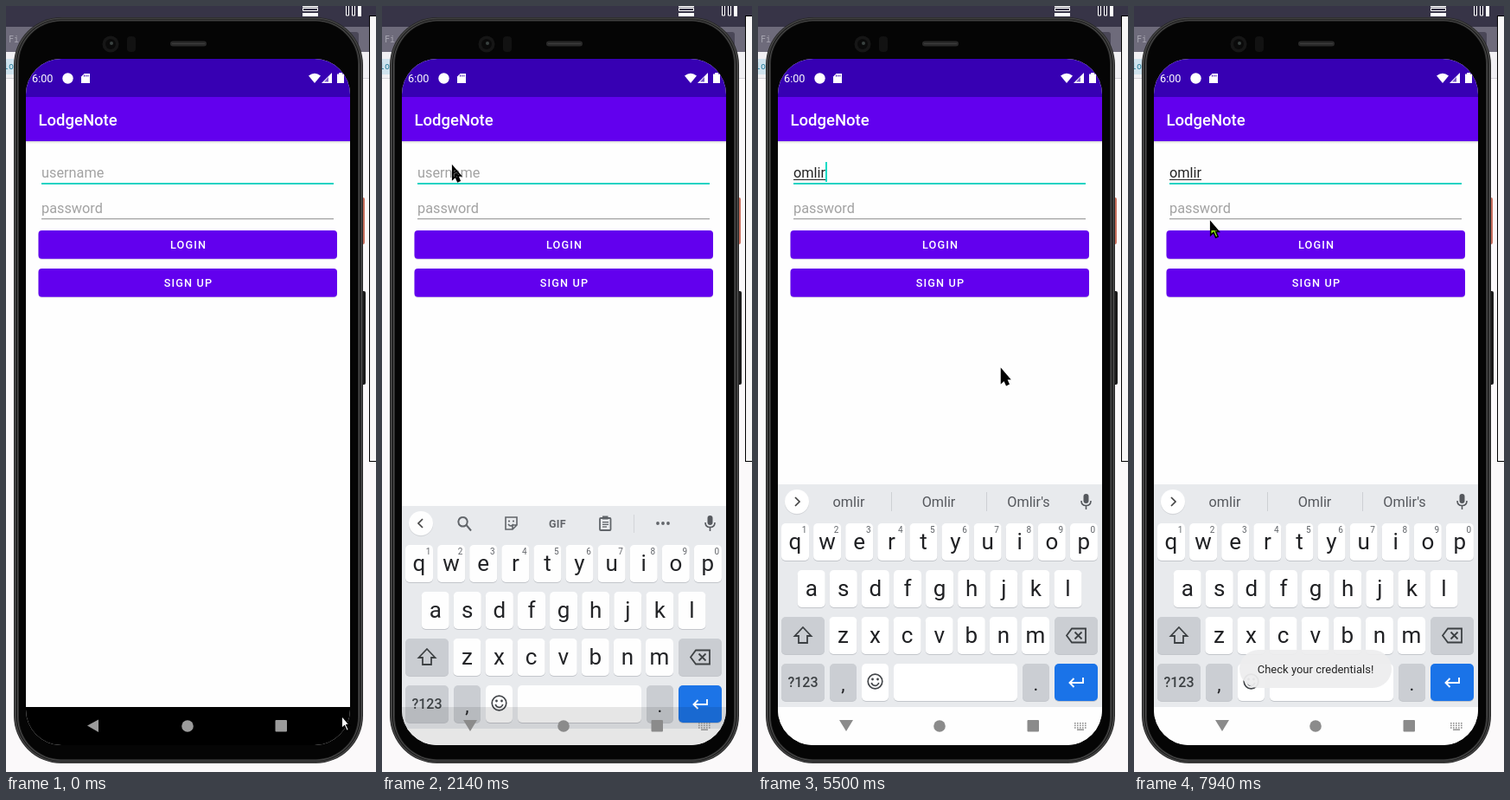
An HTML page with a canvas for the animation above (8 s loop, 428 by 884 pixels).

```html
<!DOCTYPE html>
<html lang="en">
<head>
<meta charset="utf-8">
<title>Login screen</title>
<style>
html, body { margin: 0; width: 100%; height: 100%; overflow: hidden; background: #fbf9fa; }
canvas { display: block; }
</style>
</head>
<body>
<canvas id="stage" width="428" height="884"></canvas>
<script>
const ctx = document.getElementById('stage').getContext('2d');
const LOOP = 8000, STEP = 78.6;
const NAME = 'omlir';
const TEAL = '#03dac5', PURPLE = '#6200ee', GREY = '#5f6368';

// time, x, y of the pointer
const PATH = [
  [0, 387, 817], [240, 335, 690], [560, 185, 340], [870, 107, 176], [1105, 88, 148], [1190, 88, 148],
  [1412, 86, 218], [1495, 85, 226], [1570, 83, 171], [1660, 83, 171], [1725, 80.5, 183], [4325, 80.5, 183],
  [4402, 80.5, 209], [4560, 118, 395], [4640, 155, 445], [4880, 375, 771], [4960, 374, 765],
  [5180, 368, 621], [5720, 221, 280], [7160, 221, 280], [7938, 87.5, 247.5]
];
const TYPED = [[2540, 1], [2770, 2], [2930, 3], [3080, 4], [3150, 5]];
const MARKED = [[2770, 1], [2930, 3], [3080, 4], [3400, 5]];
const HINTS = [
  [2770, ['on', 'om', 'omelet']],
  [2930, ['om', NAME, 'omelet']],
  [3080, ['oml', NAME, 'omelet']],
  [3400, [NAME, 'Omlir', "Omlir's"]]
];

const clamp = v => Math.max(0, Math.min(1, v));
const at = (list, t) => list.reduce((v, [s, x]) => t >= s ? x : v, 0);

function rect(x, y, w, h, color) {
  ctx.fillStyle = color;
  ctx.fillRect(x, y, w, h);
}
function box(x, y, w, h, r, color) {
  ctx.beginPath();
  ctx.roundRect(x, y, w, h, r);
  ctx.fillStyle = color;
  ctx.fill();
}
function frame(x, y, w, h, r, color, width = 1) {
  ctx.beginPath();
  ctx.roundRect(x, y, w, h, r);
  ctx.strokeStyle = color;
  ctx.lineWidth = width;
  ctx.stroke();
}
function disc(x, y, r, color) {
  ctx.beginPath();
  ctx.arc(x, y, r, 0, 7);
  ctx.fillStyle = color;
  ctx.fill();
}
function shape(d, color, x = 0, y = 0, width = 0) {
  ctx.save();
  ctx.translate(x, y);
  const p = new Path2D(d);
  if (width) {
    ctx.strokeStyle = color;
    ctx.lineWidth = width;
    ctx.stroke(p);
  } else {
    ctx.fillStyle = color;
    ctx.fill(p);
  }
  ctx.restore();
}
function text(s, x, y, size, color, align = 'left', weight = 400, gap = 0) {
  ctx.font = `${weight} ${size}px Roboto, Arial, sans-serif`;
  ctx.letterSpacing = gap + 'px';
  ctx.textAlign = align;
  ctx.fillStyle = color;
  ctx.fillText(s, x, y);
}

function backdrop() {
  rect(0, 0, 428, 884, '#fbf9fa');
  rect(0, 0, 428, 24, '#373447');
  rect(0, 24, 428, 29, '#6e6b7b');
  rect(0, 53, 428, 31, '#f1f0f3');
  rect(0, 61, 9, 18, '#cfe3ee');
  rect(0, 83, 428, 1, '#d4d2d8');
  ctx.font = '10px "DejaVu Sans Mono", monospace';
  ctx.letterSpacing = '0px';
  ctx.textAlign = 'left';
  ctx.fillStyle = '#a9a7b2';
  ctx.fillText('Fi', 3, 42);
  ctx.fillStyle = '#2c7f9c';
  ctx.fillText('lo', -3, 73);
  box(396, 30, 12, 17, 3, '#4a4757');
  rect(343, 0, 18, 1.5, '#fff');
  frame(343.5, 2.5, 17, 3, 0, '#fff');
  rect(343, 8, 18, 4, '#fff');
  frame(393.5, -1, 3, 12, 0, '#fff');
  frame(400.5, -1, 3, 12, 0, '#fff');
  rect(407, 0, 4, 12, '#fff');
  rect(420, 11, 8, 515, '#000');
  rect(421, 12, 8, 513, '#f8f7f7');
}

function body() {
  box(408, 221, 7, 54, 2, '#c9705e');
  box(408, 329, 8, 108, 2, '#1b1b1b');
  // rim shades from the outer edge inwards
  ['#262626', '#4b4b4b', '#343434', '#161616', '#4f4f4f', '#2a2a2a', '#050505'].forEach((c, i) =>
    box(9 + i, 13 + i * .8, 404 - 2 * i, 861 - 1.6 * i, 55 - i, c));
  disc(121, 44, 9.5, '#161616');
  disc(121, 44, 6, '#0a0a0a');
  disc(122, 43, 2, '#3a4240');
  box(140, 35, 10, 18, 4, '#121212');
  box(190, 40.5, 42, 6, 3, '#292929');
  rect(192, 43, 38, 1, '#3d3d3d');
}

function header() {
  rect(23, 61, 375, 792, '#fefefe');
  const g = ctx.createLinearGradient(0, 156, 0, 159);
  g.addColorStop(0, 'rgba(0,0,0,.16)');
  g.addColorStop(1, 'rgba(0,0,0,0)');
  rect(23, 156, 375, 3, g);
  rect(23, 61, 375, 45, '#3700b3');
  rect(23, 105, 375, 51, PURPLE);
  text('6:00', 30, 88, 12.7, '#fff');
  disc(71.5, 83.5, 6.2, '#fff');
  shape('M90.500 78H97V89H87V81.500Z', '#fff');
  for (let i = 0; i < 3; i++) rect(90 + i * 2.2, 79.5, 1, 2, '#3700b3');
  shape('M350 80.500Q357 75 364 80.500L357 89Z', '#fff');
  shape('M377 77V89H365Z', '#fff');
  shape('M373 82V87.500H368Z', '#7a58cc');
  shape('M383 78.500H385.200V77H388.800V78.500H391V89H383Z', '#fff');
  text('LodgeNote', 37.5, 138, 18.5, '#fff', 'left', 500);
}

function button(label, y, lit) {
  box(37.5, y + 1, 345.5, 32.7, 4, 'rgba(0,0,0,.1)');
  box(37.5, y, 345.5, 32.7, 4, PURPLE);
  if (lit) box(37.5, y, 345.5, 32.7, 4, `rgba(255,255,255,${lit})`);
  text(label, 211, y + 21.3, 12.7, '#fff', 'center', 500, 1.15);
}

function form(t) {
  const n = at(TYPED, t), word = NAME.slice(0, n);
  if (n) text(word, 41, 198, 16.3, '#222');
  else text('username', 41, 198, 16.3, '#a2a2a2');
  const wide = s => ctx.measureText(s).width;
  if (n) {
    const m = at(MARKED, t);
    if (m) rect(41, 200, wide(NAME.slice(0, m)), 1, '#222');
  }
  rect(41, 204, 338, 2, '#1fd3c3');
  let blink;
  if (t < 2540) blink = t >= 540 && (t - 540) % 1000 < 500;
  else blink = t < 3930 || (t - 3930) % 1000 >= 470;
  if (blink) rect(41 + (n ? wide(word) : 0), 180, 2, 23, TEAL);
  text('password', 41, 239, 16.3, '#a2a2a2');
  rect(41, 245, 338, 1.3, '#a3a3a3');
  const lit = .19 * clamp((t - 5880) / 200) * clamp((6560 - t) / 300);
  button('LOGIN', 259, lit);
  button('SIGN UP', 303, 0);
}

function key(x, y, w, color) {
  box(x, y + 1, w, 43, 5, '#c3c6cb');
  box(x, y, w, 43, 5, color);
}

function letters(row, x0, y, digits) {
  [...row].forEach((c, i) => {
    const x = x0 + i * 37.1;
    key(x - 16, y, 32, '#fff');
    text(c, x, y + 30, 26, '#202124', 'center');
    if (digits) text((i + 1) % 10, x + 10.5, y + 10.5, 10, GREY, 'center');
  });
}

function smiley(x, y, r, color) {
  ctx.beginPath();
  ctx.arc(x, y, r, 0, 7);
  ctx.strokeStyle = color;
  ctx.lineWidth = 1.7;
  ctx.stroke();
  disc(x - 3, y - 2.5, 1.4, color);
  disc(x + 3, y - 2.5, 1.4, color);
  ctx.beginPath();
  ctx.arc(x, y + .5, r * .52, .2, 2.94);
  ctx.stroke();
}

function toolbar() {
  shape('M98 574L103 580M93.500 564.500a5.300 5.300 0 1 0 .1 0', GREY, 0, .5, 2);
  shape('M143 565H156V574L151 579H143ZM151 579V574H156M146 573Q149 577 152 573', GREY, 0, 0, 1.6);
  disc(147, 569.5, 1.1, GREY);
  disc(152, 569.5, 1.1, GREY);
  text('GIF', 203, 576.5, 12.5, GREY, 'center', 700, .3);
  frame(252, 566, 12.5, 14, 1, GREY, 1.8);
  rect(255, 563.5, 6.5, 4, GREY);
  for (let i = 0; i < 3; i++) rect(255, 570 + i * 2.7, i < 2 ? 7 : 5, 1.3, GREY);
  rect(291, 562, 1, 21, '#d3d5d9');
  for (let i = -1; i < 2; i++) disc(325 + i * 6, 572, 1.9, GREY);
}

function strip(t) {
  disc(45, 573, 14.2, '#d4d6da');
  disc(45, 572, 14, '#fff');
  const hints = at(HINTS, t);
  if (hints) {
    shape('M43 567L48 572L43 577', '#444', 0, 0, 1.7);
    hints.forEach((s, i) => text(s, 105 + i * 104, 578, 16.2, '#55585d', 'center'));
    rect(154, 561, 1, 22, '#cdd0d4');
    rect(264, 561, 1, 22, '#cdd0d4');
  } else {
    shape('M47 567L42 572L47 577', '#444', 0, 0, 1.7);
    toolbar();
  }
  box(376.5, 563, 6, 11, 3, '#55585d');
  shape('M374 571Q374 576.500 379.500 576.500T385 571M379.500 576.500V581', '#55585d', 0, 0, 1.6);
}

function keyboard(t) {
  const dark = '#cbced3';
  rect(23, 552, 375, 258, '#e8eaed');
  rect(23, 809, 375, 300, '#fefefe');
  strip(t);
  letters('qwertyuiop', 43, 597, true);
  letters('asdfghjkl', 61.7, 651);
  letters('zxcvbnm', 98.4, 705);
  key(27, 705, 50, dark);
  shape('M52 717L61.500 727H57V735H47V727H42.500Z', '#3c4043', 0, 0, 1.8);
  key(343, 705, 50, dark);
  shape('M357 726.500L363 718.500H379V734.500H363ZM366.500 722.500L374.500 730.500M374.500 722.500L366.500 730.500', '#3c4043', 0, 0, 1.8);
  key(27, 759, 50, dark);
  text('?123', 52, 786, 16, '#3c4043', 'center', 500);
  key(83, 759, 31, dark);
  text(',', 98.5, 790, 22, '#202124', 'center');
  key(120, 759, 31, '#fff');
  smiley(135.5, 779.5, 8.3, '#44474b');
  key(157, 759, 143, '#fff');
  key(306, 759, 31, dark);
  text('.', 321.5, 790, 22, '#202124', 'center');
  key(343, 759, 50, '#1a73e8');
  shape('M376 775V781H361M365.500 776L360.500 781L365.500 786', '#fff', 0, 0, 1.9);
}

function navIcons(open, mix) {
  const c = open ? '#8b8b8b' : '#9b9b9b';
  shape(open && mix < .1 ? 'M94 824H110L102 837Z' : 'M94 830.500L107 823.500V838Z', c);
  disc(210, 831, 6.8, c);
  box(311.500, 824, 13.500, 13.500, 1, c);
  if (!open) return;
  for (let r = 0; r < 3; r++)
    for (let i = 0; i < 5; i++) rect(366 + i * 3, 827 + r * 2.6, 1.6, 1.5, c);
  rect(369, 834.5, 8, 1.4, c);
}

function toast(t) {
  const a = clamp((t - 6150) / 340);
  if (!a) return;
  ctx.globalAlpha = a * a * .94;
  box(122, 743, 176, 44, 22, '#ededee');
  ctx.globalAlpha = Math.pow(a, 1.2);
  text('Check your credentials!', 210, 770, 13, '#262626', 'center');
  ctx.globalAlpha = 1;
}

function pointer(t) {
  let i = 0;
  while (i < PATH.length - 2 && t >= PATH[i + 1][0]) i++;
  const [t0, x0, y0] = PATH[i], [t1, x1, y1] = PATH[i + 1];
  const k = clamp((t - t0) / (t1 - t0));
  const x = x0 + (x1 - x0) * k + .7, y = y0 + (y1 - y0) * k + 1;
  const d = 'M.5 .8V16L3.800 12.900L6.400 18.700L8.900 17.500L6.400 11.900H10Z';
  ctx.globalCompositeOperation = 'difference';
  shape(d, '#fff', x, y);
  ctx.globalCompositeOperation = 'source-over';
  shape(d, '#000', x, y, 1.6);
}

function draw(t) {
  const q = Math.floor((t + 9) / STEP) * STEP;
  backdrop();
  body();
  ctx.save();
  ctx.beginPath();
  ctx.roundRect(23, 61, 375, 792, 41);
  ctx.clip();
  header();
  form(t);
  const open = q > 1860;
  const rest = Math.pow(1 - clamp((q - 1860) / 415), 2.35);
  if (open) {
    ctx.save();
    ctx.translate(0, Math.round(264 * rest));
    ctx.globalAlpha = 1 - rest * .15;
    keyboard(t);
    ctx.restore();
  }
  rect(23, 809, 375, 44, `rgba(0,0,0,${open ? rest : 1})`);
  navIcons(open, rest);
  toast(q);
  ctx.restore();
  pointer(q);
}

let start;
function tick(now) {
  start ??= now;
  draw((now - start) % LOOP);
  requestAnimationFrame(tick);
}
draw(0);
requestAnimationFrame(tick);
</script>
</body>
</html>
```
